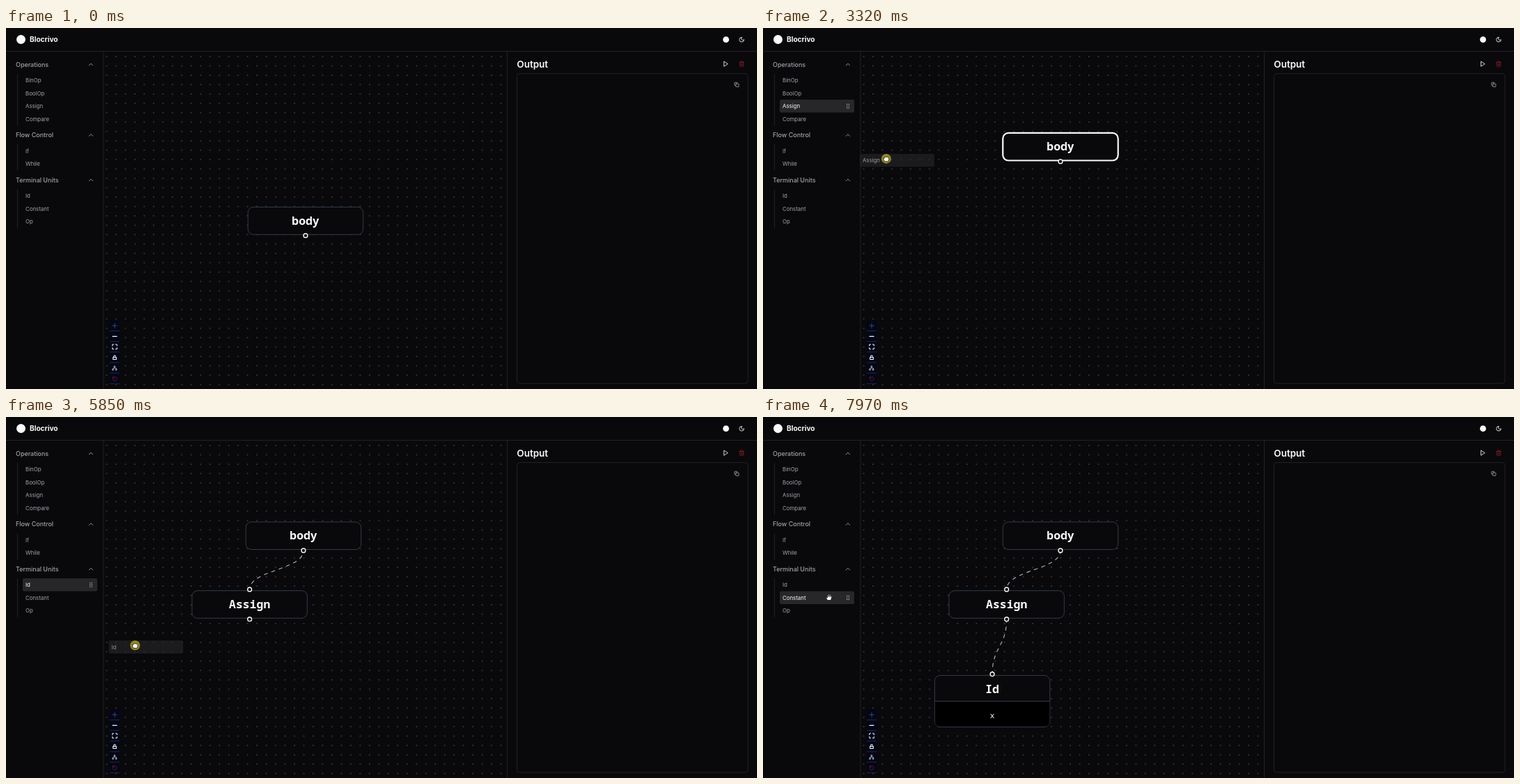
These frames come from a looping animation (1078x519 px, 8000 ms). An HTML page:

```html
<!DOCTYPE html>
<html lang="en">
<head>
<meta charset="utf-8">
<title>Node editor</title>
<style>
  html, body { margin: 0; width: 100%; height: 100%; overflow: hidden; background: #09090b; }
  svg { display: block; }
  text { font-family: Inter, sans-serif; fill: #a1a1aa; }
  .mono { font-family: "Noto Sans Mono", monospace; fill: #fafafa; text-anchor: middle; }
  .line { stroke: #222226; fill: none; }
  .icon { fill: none; stroke-linecap: round; stroke-linejoin: round; }
  .box { fill: #09090b; stroke: #323b4b; }
  .handle { fill: #09090b; stroke: #fafafa; stroke-width: 1.4; }
  .edge { fill: none; stroke: #b1b1b7; stroke-width: 1.12; }
  .dashed { stroke-dasharray: 5.615; }
</style>
</head>
<body>
<svg id="stage" width="1078" height="519" viewBox="0 0 1078 519">
  <defs>
    <pattern id="dots" x="137.8" y="34.2" width="13.476" height="13.476" patternUnits="userSpaceOnUse">
      <circle cx="6.74" cy="6.74" r=".65" fill="#777"/>
    </pattern>
  </defs>
  <rect x="140" y="34" width="579" height="485" fill="url(#dots)"/>
  <path class="line" d="M0 33.5H1078M140 34V519M719.5 34V519"/>
  <rect class="line" x="733.5" y="65.5" width="331.5" height="445.5" rx="4"/>
  <circle cx="21.5" cy="16.5" r="6.5" fill="#fafafa"/>
  <circle cx="1033.5" cy="16.7" r="4.4" fill="#fafafa"/>
  <text x="34" y="20.2" font-size="10.1" font-weight="700" style="fill:#fafafa">Blocrivo</text>
  <text x="733.3" y="56.7" font-size="13.48" font-weight="600" style="fill:#fafafa">Output</text>
  <g id="panels"></g>
  <g id="edges">
    <path id="edge1" class="edge dashed"/>
    <path id="edge2" class="edge dashed"/>
    <path id="wire" class="edge"/>
  </g>
  <g id="nodes"></g>
  <g id="ghost" opacity=".6">
    <rect width="107" height="18.6" rx="2" fill="#27272a"/>
    <text x="4" y="12.2" font-size="7.86" style="fill:#fafafa"></text>
  </g>
  <g id="cursor">
    <circle id="press" r="7" fill="#e6d21e" fill-opacity=".6"/>
    <path id="shape" fill="#fff" stroke="#000" stroke-width=".7" stroke-linejoin="round"/>
  </g>
</svg>
<script>
const $ = id => document.getElementById(id);
const add = (parent, markup) => parent.insertAdjacentHTML('beforeend', markup);
const show = (el, on) => el.setAttribute('visibility', on ? 'visible' : 'hidden');
const move = (el, x, y) => el.setAttribute('transform', `translate(${x} ${y})`);

// Sidebar
const ROW = 18.6;
const rows = [];
const panels = $('panels');
function section(title, y, items) {
  const top = y + 13.8;
  add(panels, `<text x="14" y="${y + 3.3}" font-size="8.98" font-weight="500">${title}</text>
    <path class="icon" stroke="#a1a1aa" stroke-width=".9" d="M119.2 ${y + 1.6}l2.7-2.7 2.7 2.7"/>
    <path class="line" d="M16.5 ${top}v${items.length * ROW}"/>`);
  items.forEach((name, i) => {
    const rowTop = top + i * ROW - .2, mid = rowTop + ROW / 2;
    const grip = [-2.6, 0, 2.6].map(d => `M120.7 ${mid + d}h0M123.3 ${mid + d}h0`).join('');
    add(panels, `<g><rect x="24" y="${rowTop}" width="107" height="${ROW}" rx="2" fill="#27272a"/>
      <path class="icon" stroke="#e4e4e7" stroke-width="1.3" d="${grip}"/></g>
      <text x="28" y="${mid + 2.8}" font-size="7.86">${name}</text>`);
    const label = panels.lastElementChild;
    rows.push({ name, top: rowTop, label, hover: label.previousElementSibling });
  });
}
section('Operations', 52.2, ['BinOp', 'BoolOp', 'Assign', 'Compare']);
section('Flow Control', 153.8, ['If', 'While']);
section('Terminal Units', 218.3, ['Id', 'Constant', 'Op']);

// Icons on a 24 unit grid, centred on x, y
function icon(x, y, size, color, d, extra = '') {
  const k = size / 24;
  add(panels, `<path class="icon" stroke="${color}" stroke-width="2.2" ${extra}
    transform="translate(${x - size / 2} ${y - size / 2}) scale(${k})" d="${d}"/>`);
}
icon(1056, 16.7, 9, '#fafafa', 'M12 3a6 6 0 0 0 9 9 9 9 0 1 1-9-9Z');
icon(1033.2, 51.6, 9, '#fafafa', 'M6 3l14 9-14 9Z');
icon(1056, 51.6, 9, '#8f2020', 'M3 6h18M19 6v14q0 2-2 2H7q-2 0-2-2V6M8 6V4q0-2 2-2h4q2 0 2 2v2M10 11v6M14 11v6');
icon(1048.8, 81.4, 7.4, '#c4c4c8', 'M10 8h10q2 0 2 2v10q0 2-2 2H10q-2 0-2-2V10q0-2 2-2ZM4 16q-2 0-2-2V4q0-2 2-2h10q2 0 2 2');

add(panels, '<rect x="149" y="420.5" width="14" height="91" fill="#020617"/>');
for (let i = 1; i <= 6; i++)
  add(panels, `<path stroke="#1e2a4d" d="M149 ${420.4 + i * 15.15}h14"/>`);
icon(156, 428, 8, '#4b5f8f', 'M12 2v20M2 12h20');
icon(156, 443.3, 8, '#fafafa', 'M3 12h18', 'style="stroke-width:4"');
icon(156, 458.3, 8, '#fafafa', 'M2 8V2h6M16 2h6v6M22 16v6h-6M8 22H2v-6', 'style="stroke-width:3"');
icon(156, 473.8, 8, '#fafafa', 'M5 11h14v9H5ZM8 10V7q0-4 4-4t4 4', 'style="stroke-width:3.4"');
icon(156, 489, 8, '#d4d4d8', 'M10 3h4v4h-4ZM3 17h4v4H3ZM17 17h4v4h-4ZM12 8v4M5 16v-4h14v4');
icon(156, 504, 8, '#8a1c2b', 'M4 4v6h6M4 9a9 9 0 1 1-1 5');

// Nodes: origin is the top left corner
const W = 165.4, H = 39.6, MID = W / 2;
const dot = y => `<circle class="handle" cx="${MID}" cy="${y}" r="2.9"/>`;
function node(title, x, y, handles, extra = '', height = H) {
  add($('nodes'), `<g><rect class="box" width="${W}" height="${height}" rx="8"/>${extra}
    <text class="mono" x="${MID}" y="25.6" font-size="16.45" font-weight="700">${title}</text>
    ${handles.map(dot).join('')}</g>`);
  const el = $('nodes').lastElementChild;
  move(el, x, y);
  return el;
}
const body = node('body', 347.3, 257.4, [41]);
const assign = node('Assign', 267, 249.7, [-1.8, 41]);
const ident = node('Id', 246.4, 371.5, [-1.8],
  `<path fill="#000" d="M.5 37H165V66q0 7.6-7.6 7.6H8Q.5 73.6 .5 66Z"/><path stroke="#323b4b" d="M0 37H${W}"/>
   <text class="mono" x="${MID}" y="61" font-size="11.2">x</text>`, 74.2);

const bodyOut = [427.1, 191.9], assignIn = [349.7, 247.9], assignOut = [349.7, 290.7], identIn = [329.1, 369.7];
function curve([x1, y1], [x2, y2]) {
  const my = (y1 + y2) / 2;
  return `M${x1} ${y1}C${x1} ${my} ${x2} ${my} ${x2} ${y2}`;
}
$('edge1').setAttribute('d', curve(bodyOut, assignIn));
$('edge2').setAttribute('d', curve(assignOut, identIn));

// Pointer path: time, x, y; repeated places are rests
const path = [
  [190, 866, 485], [280, 506, 326], [520, 506, 326], [740, 445, 284], [830, 445, 284],
  [1280, 442, 177.5], [1390, 442, 177.5], [1780, 122, 258], [1960, 96, 229], [2130, 85, 216],
  [2400, 71, 188], [2630, 62, 122], [2720, 62, 110], [3040, 62, 110], [3560, 267, 249],
  [3620, 267, 249], [3820, 322, 248], [4100, 351, 247], [4160, 353, 249], [4470, 353, 249],
  [4760, 427, 192], [4830, 427, 192], [5230, 70, 263], [5350, 62, 241], [5520, 62, 241],
  [6060, 247, 372], [6120, 247, 372], [6370, 290, 368], [6520, 329, 370], [6860, 329, 370],
  [7150, 350, 291], [7220, 350, 291], [7650, 100, 260], [7970, 95, 259], [8000, 95, 259]
];
const still = (a, b) => a[1] === b[1] && a[2] === b[2];
function slope(i, axis) {
  const a = path[i - 1], p = path[i], b = path[i + 1];
  if (!a || !b || still(a, p) || still(p, b)) return 0;
  const before = p[axis] - a[axis], after = b[axis] - p[axis];
  return before * after <= 0 ? 0 : (before + after) / (b[0] - a[0]);
}
function pointer(t) {
  if (t <= path[0][0]) return path[0].slice(1);
  const i = path.findIndex(p => p[0] > t) - 1;
  const a = path[i], b = path[i + 1], dt = b[0] - a[0], u = (t - a[0]) / dt, v = 1 - u;
  return [1, 2].map(k => a[k] * v * v * (1 + 2 * u) + b[k] * u * u * (3 - 2 * u)
    + dt * u * v * (v * slope(i, k) - u * slope(i + 1, k)));
}

const OPEN = 'M-2.6 4.5L-4.4 1Q-4.6-.2-3.4 .1L-2.6 1-3-2.8Q-2.3-3.8-1.7-2.8L-1.3-.6-1.1-4Q-.3-4.9 .3-4L.5-.6 1.2-3.6Q2-4.2 2.5-3.3L2.2-.2 3.3-2.2Q4.2-2.4 4.2-1.4L3 2.4 2.5 4.5Z';
const FIST = 'M-2.4 4L-3.8 1V-.6H-2.6V-2Q-1.6-3-.8-2.2 .2-3 1-2.2 2-2.8 2.6-1.8 3.8-2 3.8-.8V1.4L2.6 4Z';
const CROSS = 'M-.8-6.5H.8V-.8H6.5V.8H.8V6.5H-.8V.8H-6.5V-.8H-.8Z';

const within = (t, a, b) => t >= a && t < b;
const presses = [[800, 1360], [2880, 3590], [4300, 4800], [5440, 6110], [6700, 7190]];
const drags = [[2880, 3590, 'Assign', 3040], [5440, 6110, 'Id', 5520]];
const wires = [[4470, 4800, assignIn], [6860, 7190, identIn]];

function draw() {
  const t = performance.now() % 8000;
  const [x, y] = pointer(t);
  const pressed = presses.some(([a, b]) => within(t, a, b));
  const drag = drags.find(([a, b]) => within(t, a, b));
  const wire = wires.find(([a, b]) => within(t, a, b));

  const [bx, by] = t < 800 ? [445, 284] : t < 1360 ? [x, y] : [442, 177.5];
  move(body, 347.3 + bx - 445, 257.4 + by - 284);
  const selected = within(t, 800, 4480);
  body.firstElementChild.style.cssText = selected ? 'stroke:#fafafa;stroke-width:2.2' : '';
  show(assign, t >= 3590);
  show(ident, t >= 6110);

  show($('edge1'), t >= 4800);
  show($('edge2'), t >= 7190);
  $('edges').setAttribute('stroke-dashoffset', 11.23 * (1 - t % 500 / 500));
  show($('wire'), wire);
  if (wire) $('wire').setAttribute('d', curve(wire[2], [x, y]));

  for (const row of rows) {
    const over = drag ? drag[2] === row.name
      : t >= 190 && within(x, 24, 131) && within(y, row.top, row.top + ROW)
        || row.name === 'Compare' && within(t, 2600, 2650);
    show(row.hover, over);
    row.label.style.fill = over ? '#fafafa' : '';
  }
  const carrying = drag && t >= drag[3];
  show($('ghost'), carrying);
  if (carrying) {
    $('ghost').lastElementChild.textContent = drag[2];
    move($('ghost'), x - 38, y - 7);
  }

  const handles = [[3590, assignIn], [3590, assignOut], [6110, identIn], [4480, bodyOut]];
  const aiming = wire || handles.some(([from, [hx, hy]]) => t >= from && Math.hypot(x - hx, y - hy) < 6);
  show($('cursor'), t >= 190);
  $('press').style.display = pressed ? '' : 'none';
  $('shape').setAttribute('d', aiming ? CROSS : pressed ? FIST : OPEN);
  move($('cursor'), x, y);
  requestAnimationFrame(draw);
}
draw();
</script>
</body>
</html>
```
